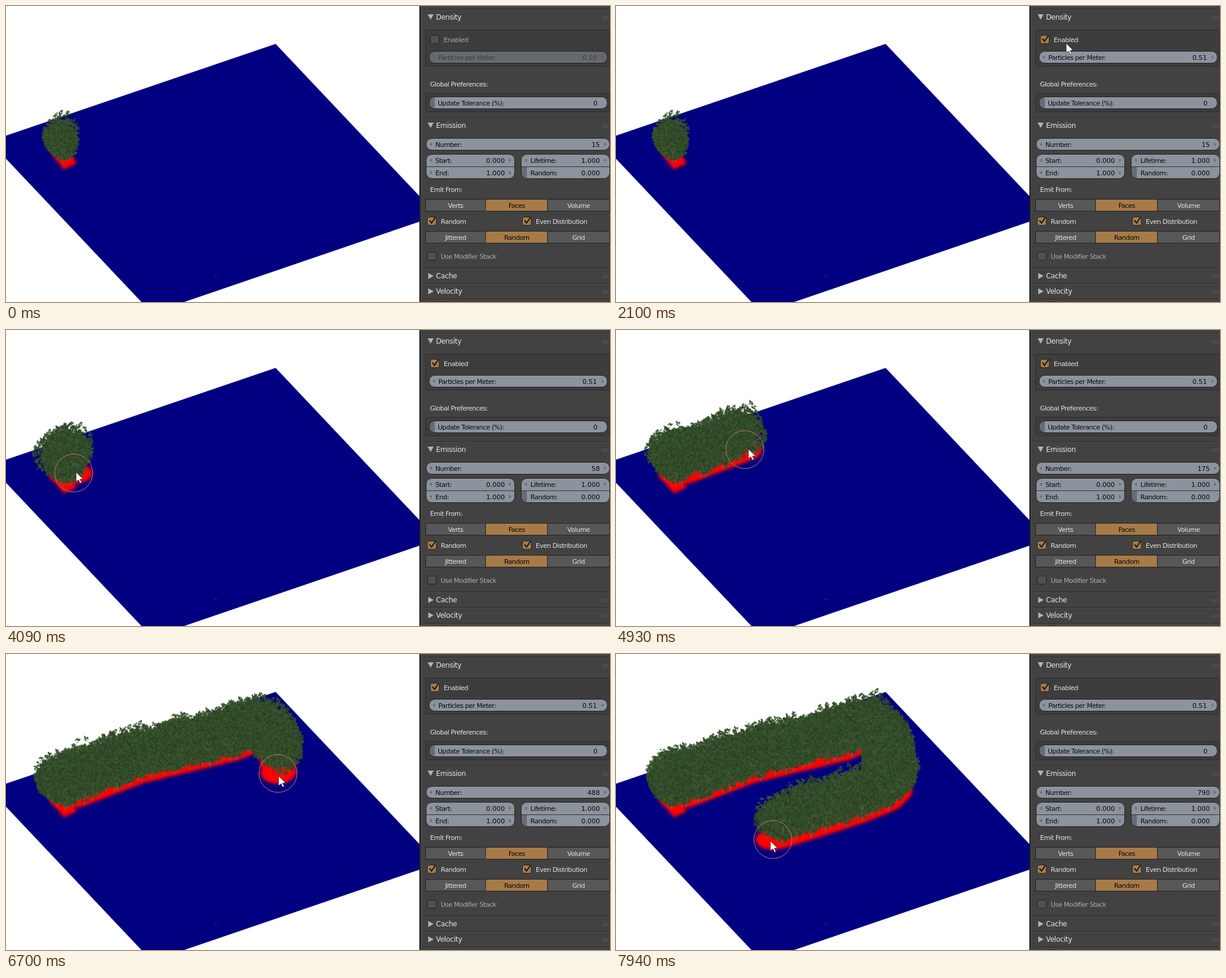
These frames come from a looping animation (1017x500 px, 8 s). An HTML page with a canvas:

```html
<!DOCTYPE html>
<html lang="en">
<head>
<meta charset="utf-8">
<title>Painting trees by density</title>
<style>
  html, body { margin: 0; width: 100%; height: 100%; overflow: hidden; background: #fff; }
  canvas, svg { position: absolute; left: 0; top: 0; }
  text { font: 11px "DejaVu Sans", sans-serif; letter-spacing: -.5px; fill: #e4e4e4; white-space: pre; }
  .head { font-size: 12px; letter-spacing: -.4px; }
  .dark { fill: #080808; }
  .faded { fill: #3b3c3e; }
  .dim { fill: #adadad; }
  .value { letter-spacing: 0; text-anchor: end; }
  .mid { text-anchor: middle; }
</style>
</head>
<body>
<canvas id="view" width="697" height="500"></canvas>
<svg id="ui" width="1017" height="500"></svg>
<script>
const LOOP = 8000, PAINT = 3680, CLICK = 1560;

// Pointer: [time, x, y]
const POINTER = [
  [190, 927, 482], [400, 870, 350], [600, 790, 190], [815, 725, 84], [920, 752, 67],
  [1030, 753, 62], [1130, 754, 57], [2000, 754, 57], [2100, 758, 63], [2310, 728, 85],
  [2620, 986, 238], [2840, 779, 244], [2950, 740, 254], [3260, 470, 283], [3680, 95, 242],
  [3890, 97, 242], [4090, 113, 242], [4930, 217, 202], [5860, 375, 164], [6080, 408, 150],
  [6300, 432, 150], [6490, 452, 172], [6700, 458, 202], [6960, 468, 232], [7130, 450, 250],
  [7420, 400, 270], [7680, 333, 292], [7940, 265, 313], [8060, 249, 322]
];
const COUNT = [[3786, 15], [4098, 58], [4930, 175], [5866, 355], [6698, 488], [7946, 790]];

function sample(keys, t) {
  if (t <= keys[0][0]) return keys[0].slice(1);
  const i = keys.findIndex(k => k[0] > t);
  if (i < 0) return keys[keys.length - 1].slice(1);
  const a = keys[i - 1], b = keys[i], u = (t - a[0]) / (b[0] - a[0]);
  return a.slice(1).map((v, j) => v + (b[j + 1] - v) * u);
}

function stepTime(t) {
  const start = [3890, 2100, 190].find(s => t >= s);
  if (start === undefined) return 0;
  const stepped = start + Math.floor((t - start + 12) / 104) * 104;
  return start === 190 && t < 2100 ? Math.min(stepped, 1999) : stepped;
}

function seeded(seed) {
  return () => {
    seed = seed + 0x6D2B79F5 | 0;
    let r = Math.imul(seed ^ seed >>> 15, 1 | seed);
    r ^= r + Math.imul(r ^ r >>> 7, 61 | r);
    return ((r ^ r >>> 14) >>> 0) / 4294967296;
  };
}

// ---- Viewport ----
const ctx = document.getElementById('view').getContext('2d');

function makeTree(seed) {
  const rnd = seeded(seed), tree = document.createElement('canvas');
  tree.width = 56; tree.height = 76;
  const c = tree.getContext('2d');
  const halfWidth = u => 18 * Math.sin(Math.PI * (.12 + .82 * u));
  const leaf = (x, y) => {
    c.fillStyle = `hsl(${99 + rnd() * 11} 29% ${18 + rnd() * 11}%)`;
    c.beginPath();
    c.ellipse(x, y, 1.2 + rnd() * 1.8, .6 + rnd() * .8, rnd() * 3, 0, 7);
    c.fill();
  };
  c.strokeStyle = '#66704a';
  c.beginPath();
  c.moveTo(28.5, 74);
  c.lineTo(26 + rnd() * 5, 45);
  c.stroke();
  for (let i = 0; i < 150; i++) {
    const u = rnd();
    leaf(28 + (rnd() * 2 - 1) * halfWidth(u), 67 - 48 * u);
  }
  // Twigs that break up the outline
  for (let i = 0; i < 14; i++) {
    const u = .1 + i / 14, side = i % 2 * 2 - 1;
    const x = 28 + side * (halfWidth(u) + rnd() * 4), y = 65 - 52 * u - rnd() * 4;
    for (let k = 0; k < 7; k++) leaf(x + (rnd() - .5) * 6, y + (rnd() - .5) * 7);
  }
  return tree;
}
const TREES = [1, 2, 3, 4, 5, 6, 7, 8].map(makeTree);

function polygon(color, ...points) {
  ctx.fillStyle = color;
  ctx.beginPath();
  points.forEach(p => ctx.lineTo(...p));
  ctx.fill();
}

function drawWeights(t) {
  ctx.save();
  ctx.filter = 'blur(2.5px)';
  polygon('#f00', [75, 248], [97, 276], [119, 266], [104, 238]);
  if (t > PAINT + 106) {
    ctx.scale(1, .6);
    ctx.strokeStyle = '#f00';
    ctx.lineWidth = 58;
    ctx.lineCap = ctx.lineJoin = 'round';
    ctx.beginPath();
    for (let s = PAINT + 200; s < t; s += 30) {
      const [x, y] = sample(POINTER, s);
      ctx.lineTo(x + 3, y / .6);
    }
    const [x, y] = sample(POINTER, t);
    ctx.lineTo(x, y / .6);
    ctx.stroke();
  }
  ctx.restore();
}

function drawTrees(t, count) {
  const rnd = seeded(count * 31), trees = [];
  for (let i = 0; i < count; i++) {
    let x, y;
    if (i < 15) {
      const a = rnd(), b = rnd();
      x = 75 + 21 * a + 18 * b;
      y = 250 + 18 * a - 4 * b;
    } else {
      const s = PAINT + (t - PAINT) * (i - 15 + rnd()) / (count - 15);
      const angle = rnd() * 2 * Math.PI, r = Math.sqrt(rnd());
      [x, y] = sample(POINTER, s);
      x += 29 * r * Math.cos(angle);
      y += 18 * r * Math.sin(angle);
    }
    trees.push({ x, y, size: .88 + rnd() ** 2 * .24, sprite: TREES[rnd() * 8 | 0] });
  }
  trees.sort((a, b) => a.y - b.y);
  for (const { x, y, size, sprite } of trees)
    ctx.drawImage(sprite, x - 28 * size, y - 74 * size, 56 * size, 76 * size);
}

function drawView(t, count) {
  ctx.clearRect(0, 0, 697, 500);
  polygon('#000080', [454, 64], [697, 322], [697, 364], [300, 500], [228, 500], [0, 258], [0, 219]);
  ctx.fillStyle = '#b4b4cc';
  ctx.fillRect(353, 455, 1, 1);
  drawWeights(t);
  drawTrees(t, count);
}

// ---- Panel ----
const rect = (x, y, w, h, fill, more = '') =>
  `<rect x="${x}" y="${y}" width="${w}" height="${h}" fill="${fill}" ${more}/>`;
const text = (x, y, s, cls = '', more = '') => `<text x="${x}" y="${y}" class="${cls}" ${more}>${s}</text>`;
const shape = (d, fill, more = '') => `<path d="${d}" fill="${fill}" ${more}/>`;
const EDGE = 'stroke="#222"';

function header(line, label, open) {
  const y = line + 13;
  let dots = '';
  for (let i = 0; i < 8; i++)
    dots += rect(1004 + i % 4 * 3, y + (i < 4 ? -1 : 2), 1, 1, '#888');
  return rect(702, line - 1, 315, 1, '#292929') + rect(702, line, 315, 1, '#525252') +
    shape(open ? `M710 ${y - 5}h10l-5 9z` : `M711 ${y - 5}v10l9 -5z`, '#b4b4b4') +
    text(724, y + 4, label, 'head') + dots;
}

const box = (y, h) => rect(706.5, y + .5, 310, h, '#3d3d3d', 'rx="3" stroke="#2b2b2b"');

// One or more rows sharing a rounded outline
function fields(x, y, w, rows, { fill = '#8c939d', cls = 'dark', inset = 16, end = 17 } = {}) {
  const h = rows.length * 21 - 1, id = `clip${x}-${y}`;
  const outline = `x="${x + .5}" y="${y + .5}" width="${w - 1}" height="${h}" rx="9.5"`;
  let out = `<clipPath id="${id}"><rect ${outline}/></clipPath><rect ${outline} fill="${fill}"/>`;
  rows.forEach(([label, value, slider, valueId], i) => {
    const top = y + i * 21, c = top + 10.5, arrow = cls === 'dark' ? '#666c75' : '#5b5f64';
    if (i) out += rect(x, top, w, 1, '#33363a');
    out += slider ? rect(x, top + 1, 10, 20, '#666c75', `clip-path="url(#${id})"`)
      : shape(`M${x + 10} ${c - 3}v6l-4 -3zM${x + w - 10} ${c - 3}v6l4 -3z`, arrow);
    out += text(x + inset, top + 15, label, cls) +
      text(x + w - end, top + 15, value, cls + ' value', valueId ? `id="${valueId}"` : '');
  });
  return out + `<rect ${outline} fill="none" ${EDGE}/>`;
}

function buttons(y, labels, active) {
  const edges = [707, 808, 912, 1017];
  return labels.map((label, i) =>
    rect(edges[i] - .5, y + .5, edges[i + 1] - edges[i], 20, i === active ? '#a67b48' : '#575757', EDGE) +
    text([757, 860, 964][i], y + 15, label, 'mid' + (i === active ? ' dark' : ''))).join('');
}

function checkbox(x, y, label, checked, cls = '') {
  return rect(x + .5, y + .5, 15, 14, checked ? '#a67b48' : '#505050', 'rx="3.5" ' + EDGE) +
    (checked ? shape(`M${x + 4} ${y + 6}l3.5 4.5l7 -10`, 'none', 'stroke="#111" stroke-width="2"') : '') +
    text(x + 23, y + 12, label, cls);
}

const ui = document.getElementById('ui');
ui.innerHTML =
  rect(697, 0, 320, 500, '#424242') + rect(696, 0, 2, 500, '#1e1e1e') + rect(698, 0, 1, 500, '#4c4c4c') +
  header(6, 'Density', true) + box(40, 61) +
  `<g id="off">${checkbox(714, 49, 'Enabled', false, 'dim')}${
    fields(712, 76, 301, [['Particles per Meter:', '0.50']], { fill: '#666a6f', cls: 'faded', end: 18 })}</g>` +
  `<g id="on">${checkbox(714, 49, 'Enabled', true)}${
    fields(712, 76, 301, [['Particles per Meter:', '0.51']], { end: 18 })}</g>` +
  text(714, 136, 'Global Preferences:') + box(147, 31) +
  fields(712, 153, 301, [['Update Tolerance (%):', '0', true]], { inset: 15 }) +
  header(189, 'Emission', true) +
  fields(707, 223, 310, [['Number:', '15', false, 'number']]) +
  fields(707, 250, 150, [['Start:', '0.000'], ['End:', '1.000']]) +
  fields(867, 250, 150, [['Lifetime:', '1.000'], ['Random:', '0.000', true]]) +
  text(714, 314, 'Emit From:') +
  buttons(326, ['Verts', 'Faces', 'Volume'], 1) +
  checkbox(709, 356, 'Random', true) + checkbox(869, 356, 'Even Distribution', true) +
  buttons(380, ['Jittered', 'Random', 'Grid'], 1) +
  checkbox(709, 415, 'Use Modifier Stack', false, 'dim') +
  header(443, 'Cache') + header(469, 'Velocity') +
  rect(702, 495, 315, 1, '#292929') + rect(702, 496, 315, 1, '#525252') + rect(727, 499, 13, 1, '#2a2a2a') +
  `<circle id="brush" r="32" fill="none" stroke="#cf7070"/>` +
  `<path id="arrow" d="M0 0V16.5L4 13L6.8 19L9.4 17.8L6.7 12H12Z" fill="#fff" stroke="#111" stroke-width=".7"/>`;

const [off, on, number, brush, arrow] =
  ['off', 'on', 'number', 'brush', 'arrow'].map(id => document.getElementById(id));
const show = (el, visible) => el.style.display = visible ? '' : 'none';

let drawnCount = 0;
function frame() {
  const now = performance.now() % LOOP, t = stepTime(now);
  const count = Math.round(sample(COUNT, t)[0]);
  const [bx, by] = sample(POINTER, t);
  const painting = t >= 2950;
  const [ax, ay] = painting ? sample(POINTER, t + 35) : [bx, by];
  if (count !== drawnCount) {
    drawView(t, count);
    number.textContent = count;
    drawnCount = count;
  }
  show(off, now < CLICK);
  show(on, now >= CLICK);
  show(brush, painting && bx < 665);
  brush.setAttribute('cx', bx);
  brush.setAttribute('cy', by);
  show(arrow, now >= 190);
  arrow.setAttribute('transform', `translate(${Math.round(ax)} ${Math.round(ay)})`);
  requestAnimationFrame(frame);
}
frame();
</script>
</body>
</html>
```
